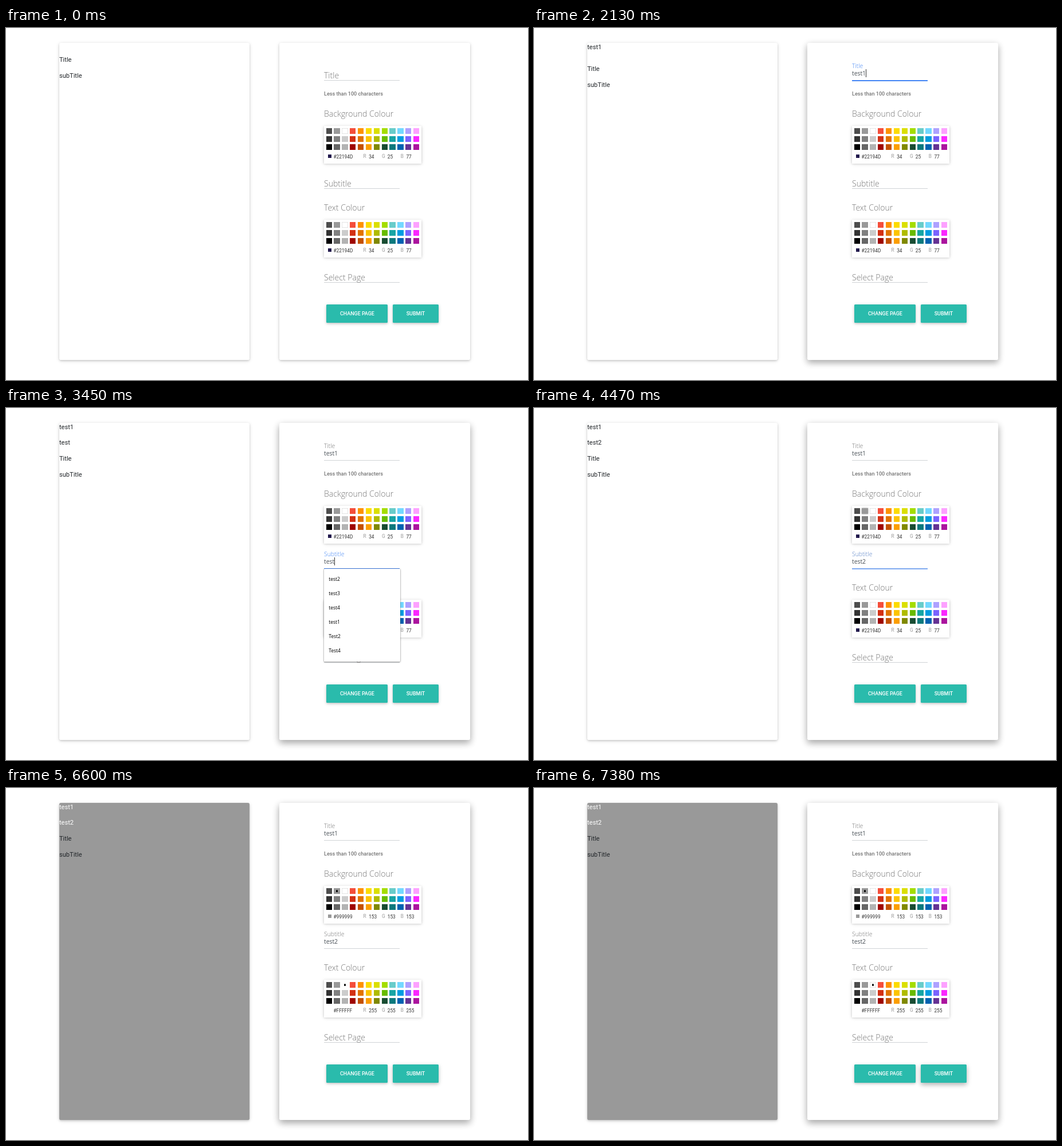
Recreate the animation shown at these times as an HTML page. Size 911 by 615 pixels, loop 8000 ms.

```html
<!DOCTYPE html>
<html lang="en">
<head>
<meta charset="utf-8">
<title>Page editor form</title>
<style>
html, body { margin: 0; width: 100%; height: 100%; overflow: hidden; background: #fff; }
#stage { position: relative; width: 911px; height: 615px; overflow: hidden; }
#stage div { position: absolute; box-sizing: border-box; }
#stage .text { line-height: 20px; margin-top: -10px; white-space: pre; }
.card { top: 25.7px; width: 332.6px; height: 554.6px; border-radius: 2.8px; background: #fff; }
.body { font: 11.08px Roboto, sans-serif; color: #212529; }
.light { font: 300 14.05px "Open Sans", sans-serif; color: #757575; }
.input { font: 10.4px "Open Sans", sans-serif; color: #495057; }
.help { font: 500 9.1px Roboto, sans-serif; color: #757575; }
.value { font: 8.3px Roboto, sans-serif; color: #333; }
.key { font: 8.3px Roboto, sans-serif; color: #999; }
.item { font: 8.5px "Open Sans", sans-serif; color: #000; }
.caps { font: 500 8.95px Roboto, sans-serif; color: #fff; }
.line { left: 555px; width: 132px; height: 1px; }
.picker { left: 555px; width: 170px; height: 66px; background: #fff;
  box-shadow: 0 1.4px 7px rgba(0,0,0,.12), 0 1.4px 3.5px rgba(0,0,0,.16); }
.swatch { width: 10.4px; height: 10.4px; }
.dot { left: 3.45px; top: 3.45px; width: 3.5px; height: 3.5px; border-radius: 50%; background: #000; }
.popup { left: 554.5px; width: 133.5px; height: 161.5px; background: #fff; border-radius: 1px;
  box-shadow: 0 0 0 .5px rgba(0,0,0,.2), 0 1px 3px rgba(0,0,0,.35); }
.button { top: 483px; height: 31.5px; background: #2abbac; border-radius: 1.5px; overflow: hidden; }
.ripple { left: -30px; top: -54px; width: 140px; height: 140px; border-radius: 50%; background: #fff; }
.caret { width: 1px; height: 14px; background: #333; }
</style>
</head>
<body>
<div id="stage"></div>
<script>
const LOOP = 8000;
const PALETTE = (
  "4D4D4D 999999 FFFFFF F44E3B FE9200 FCDC00 DBDF00 A4DD00 68CCCA 73D8FF AEA1FF FDA1FF " +
  "333333 808080 CCCCCC D33115 E27300 FCC400 B0BC00 68BC00 16A5A5 009CE0 7B64FF FA28FF " +
  "000000 666666 B3B3B3 9F0500 C45100 FB9E00 808900 194D33 0C797D 0062B1 653294 AB149E").split(" ");
const stage = document.getElementById("stage");

function box(cls, style = {}, parent = stage) {
  const el = document.createElement("div");
  el.className = cls;
  for (const k in style) el.style[k] = typeof style[k] === "number" ? style[k] + "px" : style[k];
  parent.append(el);
  return el;
}
// y is the middle of the capitals
function text(cls, left, top, content = "", parent = stage) {
  const el = box("text " + cls, { left, top }, parent);
  el.textContent = content;
  return el;
}
const show = (el, on) => { el.style.visibility = on ? "inherit" : "hidden"; };
const ramp = (t, start, length) => Math.min(1, Math.max(0, (t - start) / length));
const easeOut = p => 1 - (1 - p) ** 2;
const mix = (a, b, p) => a + (b - a) * p;

// each layer is [offset, blur, alpha]
const REST = [[1.4, 3.5, .16], [1.4, 7, .12]];
const CARD_UP = [[5.5, 11.8, .2], [4.2, 13.9, .19]];
const BUTTON_UP = [[3.5, 7.6, .18], [2.8, 10.4, .15]];
function lift(el, up, p) {
  el.style.boxShadow = REST.map((layer, i) => {
    const [y, blur, alpha] = layer.map((v, j) => mix(v, up[i][j], p));
    return `0 ${y}px ${blur}px rgba(0,0,0,${alpha})`;
  }).join();
}

function makePicker(top, picked) {
  const el = box("picker", { top });
  const swatches = PALETTE.map((hex, i) => box("swatch", {
    left: 3.5 + i % 12 * 13.86, top: 3.6 + Math.floor(i / 12) * 13.86, background: "#" + hex,
  }, el));
  const dot = box("dot", {}, swatches[picked]);
  const chip = box("", { left: 6.6, top: 49.6, width: 6.3, height: 6.3 }, el);
  const hexText = text("value", 16.5, 54, "", el);
  const values = [0, 1, 2].map(i => {
    text("key", 68.5 + i * 32.6, 53, "RGB"[i], el);
    return text("value", 78.2 + i * 32.6, 54, "", el);
  });
  return {
    swatches,
    set(hex, chosen) {
      chip.style.background = hexText.textContent = "#" + hex;
      values.forEach((v, i) => { v.textContent = parseInt(hex.slice(i * 2, i * 2 + 2), 16); });
      show(dot, chosen);
    },
  };
}

function makeField(name, y) {
  const line = box("line", { top: y });
  const label = text("light", 555, y - 8, name);
  const input = text("input", 555, y - 11.8);
  const caret = box("caret", { top: y - 19 });
  return {
    set(float, focus, value = "", caretOn = false) {
      const tint = base => `color-mix(in srgb, #4285f4 ${focus * 100}%, ${base})`;
      label.style.top = y - mix(8, 25.5, float) + "px";
      label.style.fontSize = mix(14.05, 10.4, float) + "px";
      label.style.color = tint("#757575");
      line.style.background = tint("#d0d3d6");
      line.style.boxShadow = `0 1px 0 rgba(66,133,244,${focus})`;
      input.textContent = value;
      caret.style.left = 555 + input.offsetWidth + "px";
      show(caret, caretOn);
    },
  };
}

function makePopup(top) {
  const el = box("popup", { top });
  const items = Array.from({ length: 6 }, (_, i) => text("item", 8.7, 18.3 + i * 24.95, "", el));
  return {
    set(on, list) {
      show(el, on);
      items.forEach((item, i) => { item.textContent = list[i]; });
    },
  };
}

function makeButton(left, width, name) {
  const el = box("button", { left, width });
  lift(el, BUTTON_UP, 0);
  text("caps", 24, 16, name, el);
  return el;
}

const preview = box("card", { left: 92.8 });
lift(preview, CARD_UP, 0);
const rows = ["", "", "Title", "subTitle"].map(s => text("body", 93, 0, s));
const form = box("card", { left: 477.4 });

const titleField = makeField("Title", 91);
text("help", 555, 114.6, "Less than 100 characters");
text("light", 555, 149.5, "Background Colour");
const backPicker = makePicker(171.2, 1);
const subField = makeField("Subtitle", 280);
text("light", 555, 313.8, "Text Colour");
const textPicker = makePicker(335.4, 2);
makeField("Select Page", 444).set(0, 0);
makeButton(559, 107.3, "CHANGE PAGE");
const submit = makeButton(674.7, 80, "SUBMIT");
const ripple = box("ripple", {}, submit);
const titlePopup = makePopup(92);
const subPopup = makePopup(281);
backPicker.swatches[2].style.boxShadow = "inset 0 0 0 .7px #ddd";

const RECENT = ["e", "awer", "hehehe", "test1", "test3", "eee"];
const TITLE_HITS = ["test1", "test3", "test2", "test4", "Test2", "Test4"];
const SUB_HITS = ["test2", "test3", "test4", "test1", "Test2", "Test4"];

// last key is the suggestion being taken
const typed = (t, word, times) => word.slice(0, times.filter(at => t >= at).length);

function draw(t) {
  const title = typed(t, "test1", [1410, 1470, 1560, 1620, 1890]);
  const sub = typed(t, "test2", [3210, 3270, 3360, 3450, 3750]);
  const grey = t >= 4530, white = t >= 5730;

  const dip = t < 2235 ? ramp(t, 2100, 135) : 1 - ramp(t, 2235, 135);
  lift(form, CARD_UP, ramp(t, 340, 30) - .6 * dip);

  preview.style.background = grey ? "#999" : "#fff";
  const tops = sub ? [33.6, 61.3, 89, 116.8] : title ? [33.6, 61.3, 72.3, 100] : [33.6, 61.3, 55.8, 83.6];
  rows.forEach((row, i) => { row.style.top = tops[i] + "px"; });
  rows[0].textContent = title;
  rows[1].textContent = sub;
  rows[0].style.color = rows[1].style.color = white ? "#fff" : "";

  const titleIn = easeOut(ramp(t, 820, 200)), titleOut = easeOut(ramp(t, 2790, 250));
  const subIn = easeOut(ramp(t, 2790, 200)), subOut = easeOut(ramp(t, 4430, 200));
  titleField.set(titleIn, titleIn - titleOut, title, t >= 840 && t < 1320 || t >= 1410 && t < 2370);
  subField.set(subIn, subIn - subOut, sub, t >= 2820 && t < 4260);
  titlePopup.set(t >= 960 && t < 1890, title ? TITLE_HITS : RECENT);
  subPopup.set(t >= 3210 && t < 3750, SUB_HITS);

  backPicker.set(grey ? "999999" : "22194D", grey);
  textPicker.set(white ? "FFFFFF" : "22194D", white);
  backPicker.swatches[1].style.boxShadow = t >= 4440 && t < 5580 ? "0 0 2.8px #999" : "";
  textPicker.swatches[2].style.boxShadow = t >= 5580 && t < 6660 ? "" : "inset 0 0 0 .7px #ddd";

  lift(submit, BUTTON_UP, t < 6600 ? 0 : ramp(t, 6540, 150));
  ripple.style.transform = `scale(${easeOut(ramp(t, 6630, 750))})`;
  ripple.style.opacity = .35 * (1 - ramp(t, 6880, 500));
}

function tick() {
  draw(performance.now() % LOOP);
  requestAnimationFrame(tick);
}
tick();
</script>
</body>
</html>
```
